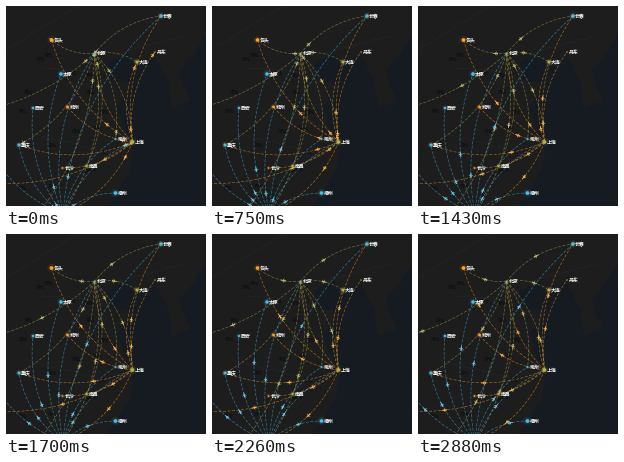
A matplotlib script for the animation above (2.95 s loop, 200 px wide and 200 px high).

```python
import matplotlib.pyplot as plt
import numpy as np
from matplotlib.animation import FuncAnimation
from matplotlib.colors import to_rgb, to_rgba

SIZE, DPI = 200, 100
PX = 72 / DPI
FRAMES, STEP = 59, 50          # 2950 ms loop
PERIOD, LEAD, DELAY = 6000, 1350, 200
RIPPLE = 4000
LAND, SEA, INK = "#1d1d1e", "#161b21", "#0c0d0e"
GREEN, ORANGE, BLUE = "#b5ad4c", "#ffa022", "#46bee9"
FONT = "Noto Sans CJK JP"

CITIES = {
    "长春": (155, 10), "包头": (45.5, 34), "北京": (88.5, 47.5),
    "丹东": (149, 46), "大连": (131, 56), "太原": (55, 68),
    "郑州": (61.5, 101), "西安": (27, 102), "重庆": (13, 139),
    "常州": (109.5, 133), "上海": (126.5, 136), "长沙": (56.5, 162),
    "南昌": (80.5, 160), "福州": (109.5, 187), "广州": (57, 208),
    "拉萨": (-80, 109), "昆明": (-28, 175.5), "成都": (-22, 133),
    "南宁": (8, 235), "海口": (38, 242),
}
# destinations run from the busiest to the quietest
ROUTES = [
    ("北京", GREEN, "上海 广州 大连 南宁 南昌 拉萨 长春 包头 重庆 常州"),
    ("上海", ORANGE, "包头 昆明 广州 郑州 长春 重庆 长沙 北京 丹东 大连"),
    ("广州", BLUE, "福州 太原 长春 重庆 西安 成都 常州 北京 海口 上海"),
]
HALF_PLANE = np.array([(2.7, .4), (.8, .45), (-1.1, 2.5), (-.4, .4),
                       (-2.5, 1.1), (-2.2, 0)])
PLANE = np.vstack([HALF_PLANE, HALF_PLANE[::-1] * (1, -1)])
rng = np.random.default_rng(7)


def control(a, b, bend=.2):
    dx, dy = b - a
    return (a + b) / 2 + bend * np.array((dy, -dx))


def bezier(a, c, b, t):
    t = np.asarray(t)[..., None]
    return (1 - t) ** 2 * a + 2 * t * (1 - t) * c + t ** 2 * b


def slope(a, c, b, t):
    return 2 * (1 - t) * (c - a) + 2 * t * (b - c)


def lighten(color, k):
    return tuple(v + (1 - v) * k for v in to_rgb(color))


def rough(points, n=12, amount=.5):
    """Resample a path finely and shake it a little."""
    points = np.array(points, float)
    k = np.arange(len(points))
    u = np.linspace(0, k[-1], k[-1] * n + 1)
    path = np.column_stack([np.interp(u, k, p) for p in points.T])
    return path + rng.normal(0, amount, path.shape)


fig = plt.figure(figsize=(SIZE / DPI, SIZE / DPI), dpi=DPI, facecolor=LAND)
ax = fig.add_axes([0, 0, 1, 1])
ax.set(xlim=(0, SIZE), ylim=(SIZE, 0))
ax.axis("off")


def draw_map():
    coast = [(98, 204), (123, 166), (128, 146), (111, 101), (129, 79),
             (103, 73), (101, 57), (122, 47), (130, 59), (149, 48),
             (163, 76), (166, 102), (184, 95), (174, 66), (204, 24)]
    shore = rough(coast, 5)
    ax.fill(*np.vstack([shore, (204, 204)]).T, fc=SEA, ec="#1a1e24", lw=.4)
    for a, b in [((0, 44), (72, 0)), ((36, 62), (92, 66)),
                 ((20, 125), (104, 148)), ((110, 48), (178, 30))]:
        ax.plot(*rough([a, b]).T, color="#292a2c", lw=.3)
    for y in range(36, 190, 18):
        for x in rng.uniform(10, 108, 2):
            ax.text(x, y + rng.uniform(-5, 5), "河北", color=INK, ha="center",
                    va="center", fontsize=4.6 * PX, family=FONT)


def draw_routes():
    flights, dots = [], []
    u = np.linspace(0, 1, 60)
    for start, color, ends in ROUTES:
        for i, end in enumerate(ends.split()):
            a, b = np.array(CITIES[start]), np.array(CITIES[end])
            curve = a, control(a, b), b
            ax.plot(*bezier(*curve, u).T, color=color, lw=.6 * PX, alpha=.62,
                    ls=(0, (5, 2.5)), dash_capstyle="butt", zorder=3)
            plane, = ax.fill(*PLANE.T, fc=lighten(color, .2), lw=0, zorder=4)
            flights.append((plane, curve, i * DELAY))
            dots.append((*b, min(95, 100 - 10 * i) * .04, color))
    return flights, dots


def draw_labels():
    for name, (x, y) in CITIES.items():
        ax.text(x + 2.2, y - .2, name, color="#f0f2f0", fontsize=4.9 * PX,
                family=FONT, weight="bold", ha="left", va="center_baseline",
                zorder=7)


draw_map()
flights, dots = draw_routes()
draw_labels()

xs, ys, sizes, hues = zip(*dots)
ax.scatter(xs, ys, s=(np.array(sizes) * PX) ** 2, c=hues, lw=0, zorder=6)
rings = [ax.scatter(xs, ys, s=1, facecolors="none", linewidths=.5 * PX,
                    zorder=5) for _ in range(3)]


def update(i):
    now = i * STEP + STEP / 2
    for plane, curve, delay in flights:
        t = (LEAD + now - delay) / PERIOD % 1
        dx, dy = slope(*curve, t)
        turn = np.array([(dx, dy), (-dy, dx)]) / np.hypot(dx, dy)
        plane.set_xy(PLANE @ turn + bezier(*curve, t))
    for k, ring in enumerate(rings):
        grow = (now / RIPPLE + k / len(rings)) % 1
        ring.set_sizes((np.array(sizes) * (1 + 1.5 * grow) * PX) ** 2)
        ring.set_edgecolors([to_rgba(h, .4 * (1 - grow)) for h in hues])
    return [plane for plane, _, _ in flights] + rings


anim = FuncAnimation(fig, update, frames=FRAMES, interval=STEP,
                     repeat=True, repeat_delay=0, blit=False)
plt.show()
```
